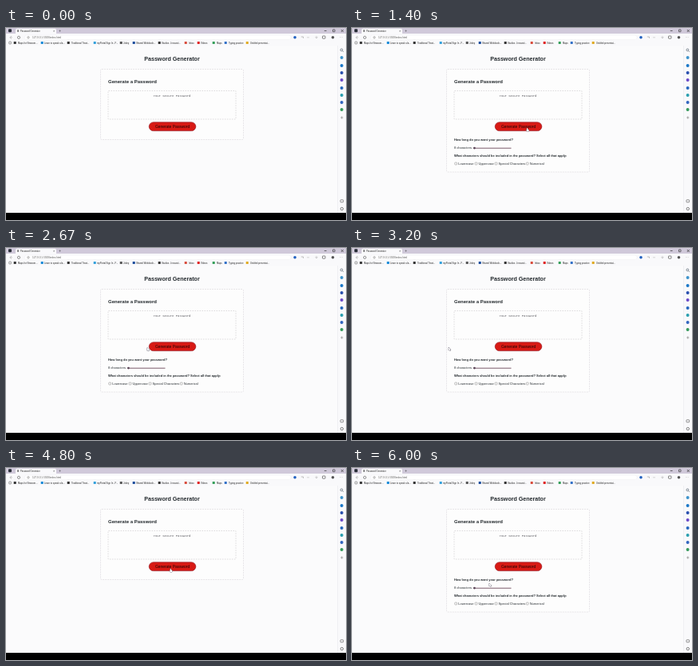
Recreate the animation shown at these times as an HTML page with a canvas. Size 426x240 px, loop 6.07 s.

```html
<!DOCTYPE html>
<html lang="en">
<head>
<meta charset="utf-8">
<title>Password Generator</title>
<style>
html, body { margin: 0; width: 100%; height: 100%; overflow: hidden; background: #000; }
canvas { display: block; width: 100vw; height: 100vh; }
</style>
</head>
<body>
<canvas id="stage"></canvas>
<script>
const W = 426, H = 240, LOOP = 6070, STEP = 1000 / 15;
const SANS = '"Liberation Sans", Arial, sans-serif';
const MONO = '"Liberation Mono", "Courier New", monospace';
const INK = '#22282c';
const canvas = document.getElementById('stage');
const ctx = canvas.getContext('2d');

function resize() {
  const ratio = window.devicePixelRatio || 1;
  canvas.width = Math.round(innerWidth * ratio);
  canvas.height = Math.round(innerHeight * ratio);
}

function rect(x, y, w, h, color) {
  ctx.fillStyle = color;
  ctx.fillRect(x, y, w, h);
}

function dot(x, y, r, color) {
  ctx.fillStyle = color;
  ctx.beginPath();
  ctx.arc(x, y, r, 0, Math.PI * 2);
  ctx.fill();
}

function ring(x, y, r, color, width = 0.6) {
  ctx.strokeStyle = color;
  ctx.lineWidth = width;
  ctx.beginPath();
  ctx.arc(x, y, r, 0, Math.PI * 2);
  ctx.stroke();
}

function line(color, width, ...points) {
  ctx.strokeStyle = color;
  ctx.lineWidth = width;
  ctx.beginPath();
  points.forEach(([x, y]) => ctx.lineTo(x, y));
  ctx.stroke();
}

function text(str, x, y, size, { color = INK, weight = 400, family = SANS, align = 'left' } = {}) {
  ctx.font = `${weight} ${size}px ${family}`;
  ctx.textAlign = align;
  ctx.fillStyle = color;
  ctx.fillText(str, x, y);
}

function box(x, y, w, h, radius, fill, stroke, dash = []) {
  ctx.beginPath();
  ctx.roundRect(x, y, w, h, radius);
  if (fill) { ctx.fillStyle = fill; ctx.fill(); }
  if (stroke) {
    ctx.setLineDash(dash);
    ctx.strokeStyle = stroke;
    ctx.lineWidth = 0.7;
    ctx.stroke();
    ctx.setLineDash([]);
  }
}

const bookmarks = [
  [11, 15, 'Maps for Newcom...', '#333'],
  [45, 48, 'Learn to speak a la...', '#1689d8'],
  [78, 82, 'Traditional Treat...', '#333'],
  [111, 114, 'myPortal Sign In - F...', '#32a0dc'],
  [144, 147, 'Jokey', '#555'],
  [160, 163, 'Shared Workbook...', '#164a9c'],
  [192, 195, 'Studios - Innovati...', '#333'],
  [225, 229, 'Inbox', '#d84c3c'],
  [241, 244, 'Videos', '#e02020'],
  [260, 264, 'Maps', '#36a05a'],
  [275, 279, 'Typing practice', '#3270c8'],
  [302, 306, 'Untitled presentat...', '#e0aa20']
];

const sideIcons = [
  [37, '#3f94cc'], [47, '#1b78c8'], [56, '#284fae'], [65, '#6a48c8'],
  [75, '#2567bd'], [84, '#2a9fb0'], [93, '#3266c0'], [102, '#36995c']
];

function drawBrowser() {
  rect(0, 0, W, 231, '#fbfbfc');
  rect(0, 0, W, 7, '#d0c9da');
  box(12, 0.7, 51, 8, [2, 2, 0, 0], '#f9f9fb');
  rect(0, 7, W, 15.5, '#f9f9fb');
  box(3, 1.3, 4, 4, 1, '#2a2e38');
  rect(14, 2.3, 2.2, 2.6, '#888');
  text('Password Generator', 18, 4.7, 2.7, { color: '#222' });
  text('×', 59, 4.9, 4, { color: '#333' });
  text('+', 66.3, 5, 4.5, { color: '#333' });

  line('#333', 0.7, [398.8, 3.5], [401.6, 3.5]);
  box(409.5, 2, 2.5, 2.7, 0.3, null, '#333');
  line('#333', 0.7, [419.8, 2], [422.8, 5]);
  line('#333', 0.7, [422.8, 2], [419.8, 5]);

  line('#aaa', 0.6, [7, 10], [4.8, 11.8], [7, 13.6]);
  line('#aaa', 0.6, [4.8, 11.8], [8, 11.8]);
  ring(16, 11.8, 1.6, '#555');
  box(23, 8.9, 334, 5.7, 2.8, '#fff', '#f2f2f5');
  ring(28, 11.8, 1.2, '#666', 0.5);
  text('127.0.0.1:5500/index.html', 33, 12.9, 3.15, { color: '#555' });

  dot(362, 11.7, 1.8, '#2060c0');
  line('#999', 0.6, [372.5, 12.8], [372.5, 11], [369.8, 11]);
  line('#bbb', 0.6, [377, 11.8], [380, 11.8]);
  text('☆', 387, 13.3, 4.4, { color: '#444', family: '"DejaVu Sans", sans-serif' });
  box(396.5, 10, 3.5, 3.2, 0.5, null, '#555');
  dot(409.5, 11.8, 1.8, '#555');
  text('···', 418, 12.6, 4, { color: '#555' });

  box(3.8, 17.1, 2.6, 2.8, 0.3, null, '#777');
  bookmarks.forEach(([icon, x, name, color]) => {
    rect(icon - 1.3, 17, 3, 3, color);
    text(name, x, 19.6, 2.75, { color: '#222' });
  });

  rect(415, 22, 11, 209, '#f9f9fb');
  rect(415, 22, 0.6, 209, '#e9e9ee');
  ring(420.4, 27.4, 1.4, '#345');
  line('#345', 0.6, [421.5, 28.5], [422.8, 29.8]);
  sideIcons.forEach(([y, color]) => dot(420.6, y, 2, color));
  line('#777', 0.6, [419.2, 112], [422.4, 112]);
  line('#777', 0.6, [420.8, 110.4], [420.8, 113.6]);
  box(419, 214.8, 3.6, 3, 0.5, null, '#666');
  ring(420.8, 226, 1.7, '#666', 0.8);
}

function drawOptions() {
  text('How long do you want your password?', 128, 141.2, 3.98, { weight: 700 });
  text('8 characters', 128, 151.2, 4);
  line('#6c4a5c', 0.9, [152, 150.2], [199.5, 150.2]);
  dot(153.4, 150.1, 1.4, '#5c4658');
  text('What characters should be included in the password? Select all that apply:', 128, 161.2, 3.98, { weight: 700 });
  [[130.2, 'Lowercase'], [155.5, 'Uppercase'], [180.5, 'Special Characters'], [219.7, 'Numerical']]
    .forEach(([x, label]) => {
      box(x - 1.4, 168.1, 2.8, 2.8, 0.5, '#fff', '#a0a0a0');
      text(label, x + 3, 171.1, 4);
    });
}

function drawPage(open) {
  text('Password Generator', 208, 40.9, 7.1, { weight: 700, align: 'center' });
  box(118.5, 51.5, 179, open ? 128.5 : 88, 1.5, '#fdfdfd', '#dfdbe0', [2, 1]);
  text('Generate a Password', 128, 68.8, 6, { weight: 700 });
  box(128, 78.5, 160, 35.5, 0.5, '#fdfdfd', '#cfcccf', [1.5, 1.5]);
  text('Your Secure Password', 208, 86, 3.92, { family: MONO, align: 'center', color: '#56565c' });
  box(179.2, 117.8, 58.6, 10.8, 5.4, '#d81a14', '#98202c');
  text('Generate Password', 208.5, 125, 4.9, { align: 'center', color: '#200606' });
  if (open) drawOptions();
}

// Pointer positions: time, x, y.
const path = [
  [500, 232, 180], [900, 220, 126], [1400, 219.5, 125], [2130, 218, 125],
  [2400, 217, 125], [3000, 121, 124], [3870, 122, 125], [4100, 123, 125],
  [4700, 206.2, 125.8], [5250, 206.2, 125.8], [5800, 172, 144], [LOOP, 172, 144]
];

function pointerAt(t) {
  const i = path.findIndex(([time]) => time >= t);
  if (i < 1) return null;
  const [t0, x0, y0] = path[i - 1];
  const [t1, x1, y1] = path[i];
  const k = (t - t0) / (t1 - t0);
  const ease = k * k * (3 - 2 * k);
  return [x0 + (x1 - x0) * ease, y0 + (y1 - y0) * ease];
}

function drawPointer([x, y]) {
  const overButton = x > 179 && x < 238 && y > 117 && y < 129;
  ctx.save();
  ctx.translate(x, y);
  ctx.fillStyle = '#fff';
  ctx.strokeStyle = '#3a3448';
  ctx.lineWidth = 0.6;
  ctx.beginPath();
  if (overButton) {
    ctx.roundRect(-0.5, 0, 1.1, 3.5, 0.5);
    ctx.roundRect(-0.9, 1.7, 3, 2.7, 0.8);
  } else {
    [[0, 0], [0, 3.9], [0.9, 3], [1.6, 4.4], [2.2, 4.1], [1.6, 2.8], [2.8, 2.8]]
      .forEach(([px, py]) => ctx.lineTo(px, py));
    ctx.closePath();
  }
  ctx.stroke();
  ctx.fill();
  ctx.restore();
}

function render(now) {
  const t = Math.floor((now % LOOP + 5) / STEP) * STEP;
  const open = (t >= 1000 && t < 3530) || t >= 5060;
  ctx.setTransform(canvas.width / W, 0, 0, canvas.height / H, 0, 0);
  rect(0, 0, W, H, '#000');
  drawBrowser();
  drawPage(open);
  const pointer = pointerAt(t);
  if (pointer) drawPointer(pointer);
  requestAnimationFrame(loop);
}

const start = performance.now();
function loop() { render(performance.now() - start); }
addEventListener('resize', resize);
resize();
loop();
</script>
</body>
</html>
```
